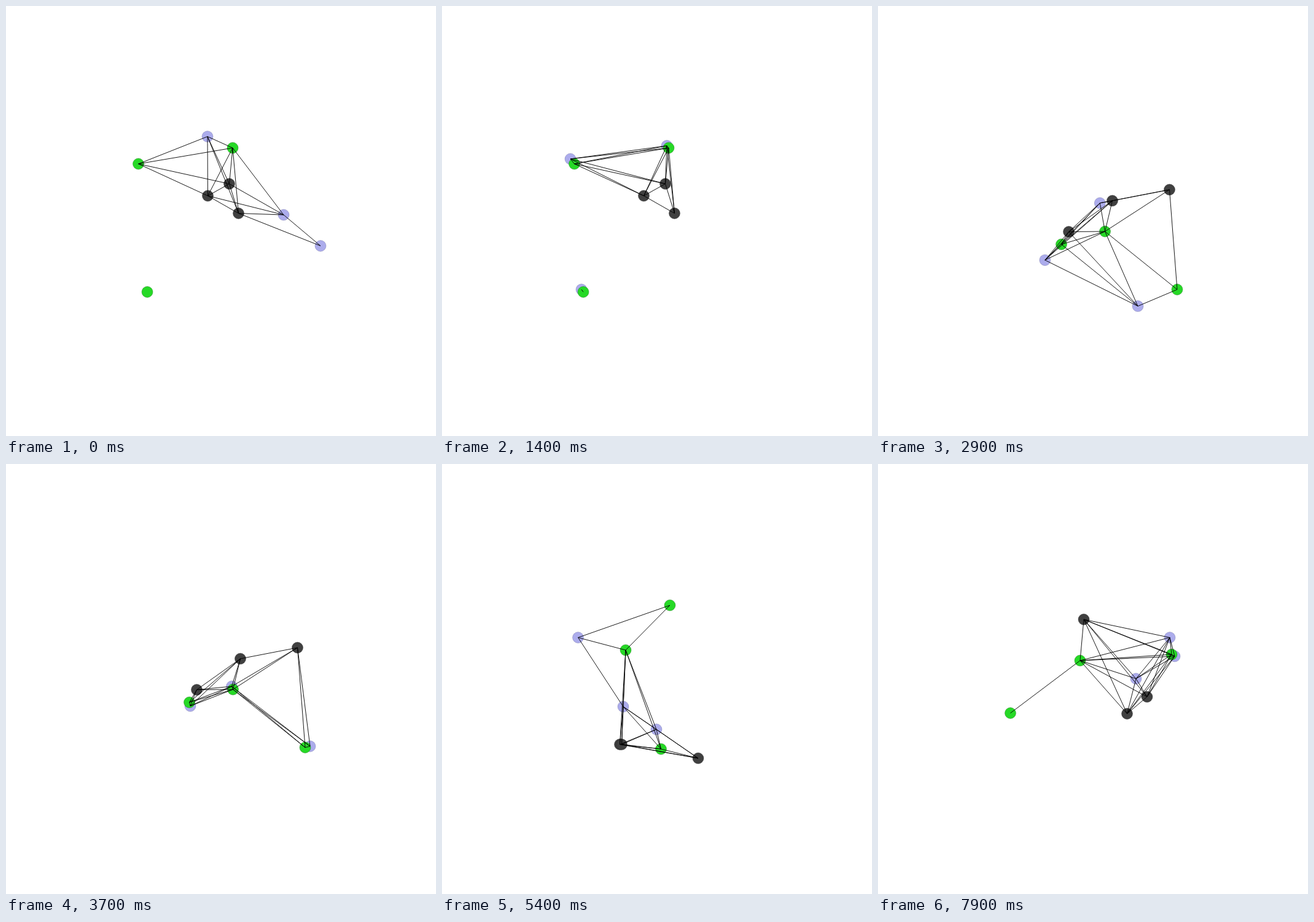
Recreate the animation shown at these times as an HTML page with a canvas. Size 700 by 700 pixels, loop 8 s.

```html
<!DOCTYPE html>
<html lang="en">
<head>
<meta charset="utf-8">
<title>Agents and landmarks</title>
<style>
  html, body { margin: 0; width: 100%; height: 100%; overflow: hidden; background: #fff; }
  canvas { display: block; }
</style>
</head>
<body>
<canvas id="stage" width="700" height="700"></canvas>
<script>
const STEP = 100, LOOP = 8000, EPISODE = 25, FIRST = 2;
const RADIUS = 9, REACH = 171.4, POWER = 1.9;
const ctx = document.getElementById('stage').getContext('2d');

// Each agent speeds up from its start to a turning point, then brakes to its
// rest; "times" holds the steps of these three points.
const episodes = [
  {
    times: [2, 10, 16],
    goals: [[215.5, 257], [369, 231], [230, 465.5]],
    walls: [[363.5, 289.5], [328.5, 309], [378.5, 337.5]],
    agents: [
      [[328, 212.5], [365.5, 230], [366, 227.5]],
      [[452, 340], [293, 319.5], [209, 249]],
      [[512, 390.5], [357, 421], [227, 461.5]]
    ]
  },
  {
    times: [0, 4, 14],
    goals: [[298.5, 388], [369.5, 367], [487, 461.5]],
    walls: [[474.5, 299], [381.5, 317], [310.5, 367.5]],
    agents: [
      [[203, 430], [257, 424], [300, 394]],
      [[345, 194], [358, 299], [367.5, 362]],
      [[360, 492], [385, 504], [495, 459.5]]
    ]
  },
  {
    times: [0, 6, 14],
    goals: [[371, 230], [299, 303], [356.5, 464]],
    walls: [[289.5, 456.5], [292.5, 456.5], [417, 479]],
    agents: [
      [[197, 320], [221.5, 282.5], [371, 229]],
      [[288, 487], [295, 395], [302, 306]],
      [[338, 400], [349, 432], [356, 466.5]]
    ]
  },
  {
    times: [0, 6, 14],
    goals: [[478, 310], [329, 320], [215.5, 405.5]],
    walls: [[335, 253], [438, 379], [405.5, 406.5]],
    agents: [
      [[442, 188], [475, 282.5], [478, 310]],
      [[462, 352], [483, 313], [329, 320]],
      [[415, 524], [420, 349.5], [215.5, 405.5]]
    ]
  }
];

const clamp = v => Math.min(Math.max(v, 0), 1);
const mix = (a, b, k) => a.map((v, i) => v + (b[i] - v) * k);

function place([start, turn, rest], [t0, t1, t2], step) {
  if (step <= t1) return mix(start, turn, clamp((step - t0) / (t1 - t0)) ** POWER);
  return mix(rest, turn, clamp((t2 - step) / (t2 - t1)) ** POWER);
}

function disc([x, y], fill, rim) {
  ctx.beginPath();
  ctx.arc(x, y, RADIUS, 0, Math.PI * 2);
  ctx.fillStyle = fill;
  ctx.fill();
  ctx.lineWidth = 0.7;
  ctx.strokeStyle = rim;
  ctx.stroke();
}

function links(nodes, seen) {
  ctx.lineWidth = 1;
  ctx.strokeStyle = 'rgba(0,0,0,.9)';
  for (let i = 0; i < nodes.length; i++) {
    for (let j = i + 1; j < nodes.length; j++) {
      if (Math.hypot(seen[i][0] - seen[j][0], seen[i][1] - seen[j][1]) > REACH) continue;
      ctx.beginPath();
      ctx.moveTo(...nodes[i]);
      ctx.lineTo(...nodes[j]);
      ctx.stroke();
    }
  }
}

function draw(tick) {
  const count = tick + FIRST, step = count % EPISODE;
  const { times, goals, walls, agents } = episodes[Math.floor(count / EPISODE)];
  const now = agents.map(a => place(a, times, step));
  // Links follow the distances of the previous step.
  const before = agents.map(a => place(a, times, step - 1));
  ctx.fillStyle = '#fff';
  ctx.fillRect(0, 0, 700, 700);
  now.forEach(p => disc(p, 'rgba(89,89,217,.5)', 'rgba(45,45,108,.35)'));
  goals.forEach(p => disc(p, '#26d926', 'rgba(19,108,19,.6)'));
  walls.forEach(p => disc(p, '#404040', 'rgba(32,32,32,.6)'));
  links([...now, ...goals, ...walls], [...before, ...goals, ...walls]);
}

const begin = performance.now();
let shown = -1;
function frame() {
  const tick = Math.floor(((performance.now() - begin) % LOOP) / STEP);
  if (tick !== shown) draw(shown = tick);
  requestAnimationFrame(frame);
}
frame();
</script>
</body>
</html>
```
